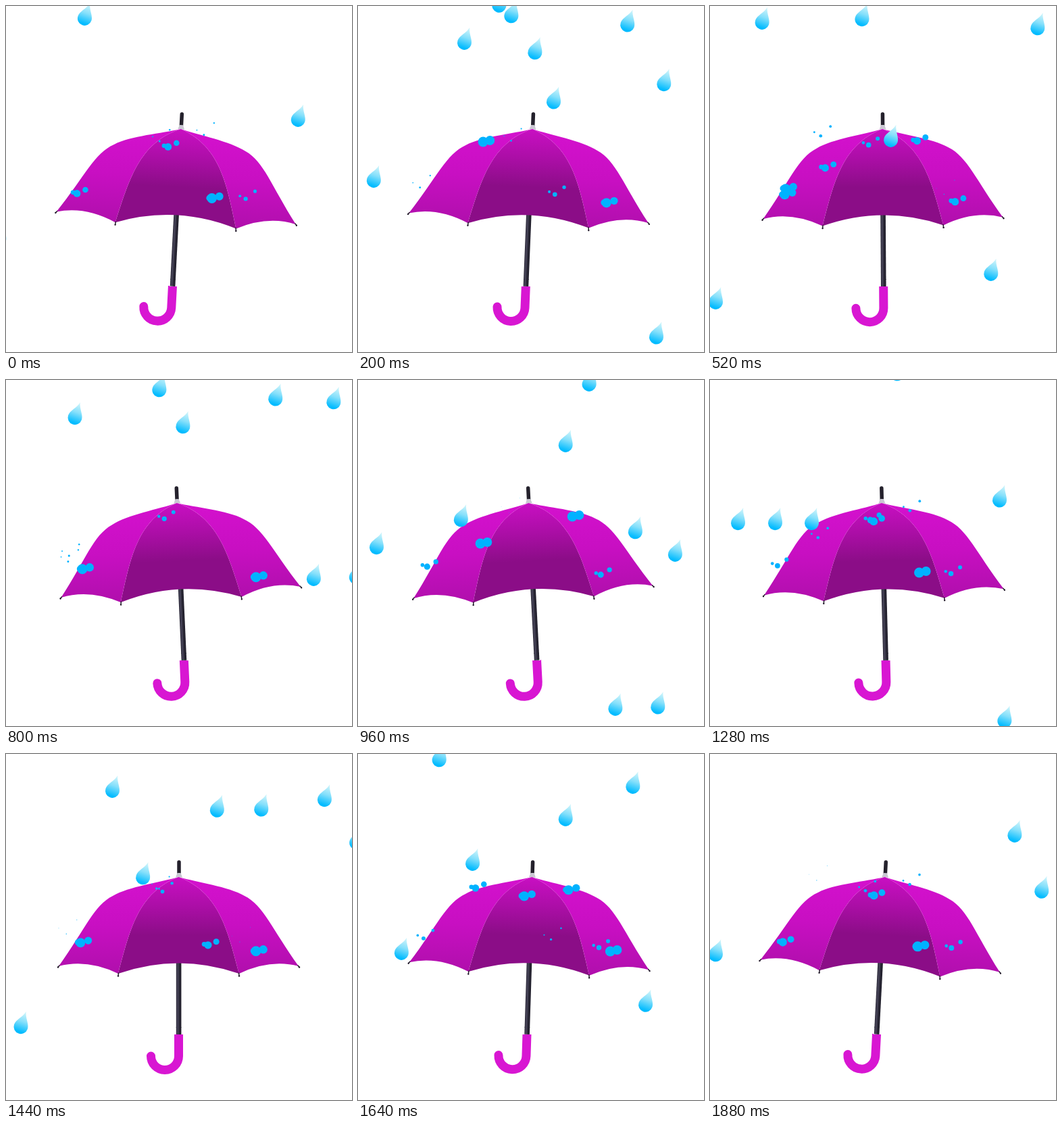
Recreate the animation shown at these times as an HTML page with a canvas. Size 512 px wide and 512 px high, loop 1920 ms.

```html
<!DOCTYPE html>
<html lang="en">
<head>
<meta charset="utf-8">
<title>Umbrella in the rain</title>
<style>
  html, body { margin: 0; width: 100%; height: 100%; overflow: hidden; background: #fff; }
  canvas { display: block; width: 512px; height: 512px; }
</style>
</head>
<body>
<canvas id="stage" width="512" height="512"></canvas>
<script>
const ctx = document.getElementById('stage').getContext('2d');
const LOOP = 1920, STEP = 40;
const SPEED = 1.2;   // px per ms, downwards
const SLANT = 0.388; // px left per px down
const SPLASH = 450;  // ms

// x: where the lane crosses the top edge; starts: when each drop crosses it;
// hit: where the drop bursts on the canopy
const lanes = [
  { x: 85, starts: [503] },
  { x: 122, starts: [-12, 757, 1107, 1636] },
  { x: 177, starts: [158, 1107, 1398] },
  { x: 207, starts: [204], hit: [122, 270] },
  { x: 231, starts: [191, 507, 791, 1107, 1508], hit: [121, 279] },
  { x: 272, starts: [20, 1291], hit: [190, 200] },
  { x: 287, starts: [146, 746], hit: [186, 241] },
  { x: 343, starts: [85, 358, 883, 958, 1374, 1563], hit: [256, 210] },
  { x: 408, starts: [180, 780, 1375], hit: [322, 201] },
  { x: 424, starts: [1037, 1603], hit: [314, 284] },
  { x: 496, starts: [107, 496, 776, 1135, 1387, 1783], hit: [378, 291] },
  { x: 568, starts: [193, 558, 748, 1334, 1714], once: true },
  { x: 630, starts: [-205, 560, 863] }
];

function fade(y0, y1, ...colors) {
  const g = ctx.createLinearGradient(0, y0, 0, y1);
  colors.forEach((c, i) => g.addColorStop(i / (colors.length - 1), c));
  return g;
}

const sidePaint = fade(182, 325, '#d411ce', '#c80fc2', '#b00fac');
const midPaint = fade(184, 268, '#c70fc1', '#ab0ea6', '#8b0d87');
const dropPaint = fade(-24, 8, '#d8f7fb', '#86e0fb', '#00bbff');
const shaftPaint = ctx.createLinearGradient(251, 0, 260, 0);
[[0, '#1c1a26'], [0.35, '#4a475c'], [0.6, '#2a2836'], [1, '#1c1a26']]
  .forEach(([at, c]) => shaftPaint.addColorStop(at, c));

const sidePanel = new Path2D(`M255.5 182 C228 190 182 196 158 210 C130 224 118 258 78 314
  Q120 303 166 325 C183 262 195 205 255.5 182Z`);
const midPanel = new Path2D(`M255.5 182 C195 205 183 262 166 325 Q255.5 294 345 325
  C328 262 316 205 255.5 182Z`);
const rib = new Path2D('M166.5 324 L166 328.5 M79 313 L77 315.5');
const handle = new Path2D('M255.5 415 V447 A20.5 20.5 0 0 1 214.5 447');
const collar = new Path2D('M253.5 176 H258.5 L261 182.5 H251Z');
const dropShape = new Path2D(`M0 -24 C2 -14 10.5 -8 10.5 0
  A10.5 10.5 0 0 1 -10.5 0 C-10.5 -8 -2 -14 0 -24Z`);

function stroke(path, color, width, cap = 'round') {
  ctx.strokeStyle = color;
  ctx.lineWidth = width;
  ctx.lineCap = cap;
  ctx.stroke(path);
}

function fill(path, paint) {
  ctx.fillStyle = paint;
  ctx.fill(path);
}

function dot(x, y, r) {
  ctx.beginPath();
  ctx.arc(x, y, r, 0, 2 * Math.PI);
  ctx.fill();
}

function drawSide() {
  fill(sidePanel, sidePaint);
  stroke(rib, '#241c2c', 1.5);
  ctx.fillStyle = '#241c2c';
  dot(77, 315.5, 1.2);
  dot(166, 328.5, 1.2);
}

function drawUmbrella(t) {
  const angle = 3 * Math.cos(2 * Math.PI * t / LOOP) * Math.PI / 180;
  ctx.save();
  ctx.translate(256, 242);
  ctx.rotate(angle);
  ctx.translate(-256, -242);

  ctx.fillStyle = shaftPaint;
  ctx.fillRect(251.8, 300, 7.6, 117);
  stroke(handle, '#d816d2', 13);
  // square off the top of the grip
  ctx.fillStyle = shaftPaint;
  ctx.clearRect(247, 405, 17, 10);
  ctx.fillRect(251.8, 404, 7.6, 11);

  stroke(new Path2D('M256 160 V177'), '#24212c', 5.5);
  fill(collar, '#c9c8d2');

  fill(midPanel, midPaint);
  drawSide();
  ctx.save();
  ctx.translate(511, 0);
  ctx.scale(-1, 1);
  drawSide();
  ctx.restore();
  ctx.restore();
}

function drawDrop(x, y) {
  ctx.save();
  ctx.translate(x, y + 4);
  ctx.rotate(19 * Math.PI / 180);
  fill(dropShape, dropPaint);
  ctx.restore();
}

function drawSplash([x, y], p) {
  const q = p * p, left = 1 - p;
  ctx.fillStyle = '#00b2ff';
  dot(x - 6 - 40 * p, y + 1 - 26 * q, Math.min(5, 5.5 * left));
  dot(x - 4 - 30 * p, y + 1 - 16 * q, Math.min(7.5, 9 * left));
  dot(x + 6 - 24 * p, y - 1 - 38 * q, Math.min(7, 7.2 * left));
}

function drawRain(t) {
  const drops = [];
  for (const { x, starts, hit, once } of lanes) {
    for (const start of starts) {
      for (const shift of once ? [0] : [-LOOP, 0, LOOP]) {
        const age = t - start - shift;
        const y = age * SPEED;
        const burst = hit ? age - hit[1] / SPEED : -1;
        if (burst >= SPLASH || y < -30) continue;
        if (burst >= 0) drawSplash(hit, burst / SPLASH);
        else if (y < 550) drops.push([x - SLANT * y, y]);
      }
    }
  }
  drops.forEach(d => drawDrop(...d));
}

function frame() {
  const t = Math.floor(performance.now() % LOOP / STEP) * STEP;
  ctx.clearRect(0, 0, 512, 512);
  drawUmbrella(t);
  drawRain(t);
  requestAnimationFrame(frame);
}
frame();
</script>
</body>
</html>
```
